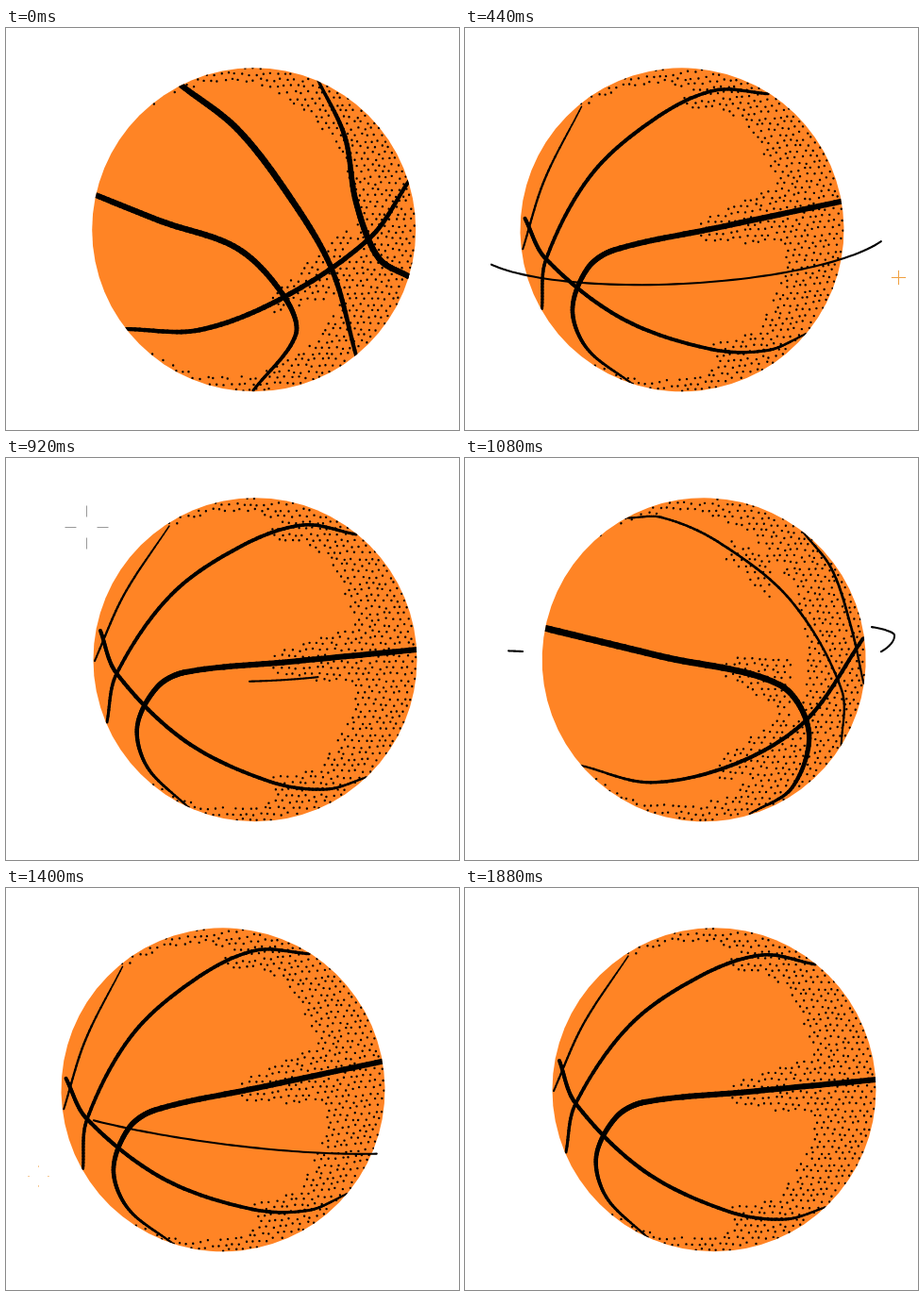
Recreate the animation shown at these times as an HTML page with a canvas. Size 480x426 px, loop 1.92 s.

```html
<!DOCTYPE html>
<html lang="en">
<head>
<meta charset="utf-8">
<title>Spinning basketball</title>
<style>
  html, body { margin: 0; width: 100%; height: 100%; overflow: hidden; background: #fff; }
  canvas { display: block; width: 480px; height: 426px; }
</style>
</head>
<body>
<canvas id="stage" width="480" height="426"></canvas>
<script>
const W = 480, H = 426, R = 171.5, CY = 213.8;
const STEP = 40, STEPS = 48, HOLD = 3;
const ORANGE = '#ff8425', INK = '#000';
const { PI, sin, cos, hypot, min, max, abs } = Math;
const ctx = document.getElementById('stage').getContext('2d');

const clamp = v => max(0, min(1, v));
const mix = (a, b, k) => a + (b - a) * k;
const rad = deg => deg * PI / 180;

// The ball swings sideways and leans with the swing.
const swing = n => cos((n - 22.4) * PI / 12);
const ballX = n => 247 + 17.2 * swing(n);
const lean = n => rad(3.3) * swing(n);

function random(seed) {
  return () => (seed = (seed * 16807) % 2147483647) / 2147483647;
}

// Smooth curve through points, tangents weighted by chord length
function curve(pts, n = 16) {
  const dist = (a, b) => hypot(b[0] - a[0], b[1] - a[1]);
  const slopes = pts.map((p, i) => {
    const a = pts[max(0, i - 1)], b = pts[min(pts.length - 1, i + 1)];
    const d = dist(a, p) + dist(p, b);
    return [(b[0] - a[0]) / d, (b[1] - a[1]) / d];
  });
  const out = [pts[0]];
  for (let i = 1; i < pts.length; i++) {
    const a = pts[i - 1], b = pts[i], h = dist(a, b);
    for (let j = 1; j <= n; j++) {
      const t = j / n, u = 1 - t;
      out.push([0, 1].map(k =>
        a[k] * u * u * (1 + 2 * t) + b[k] * t * t * (3 - 2 * t)
        + h * t * u * (slopes[i - 1][k] * u - slopes[i][k] * t)));
    }
  }
  return out;
}

// A seam runs from width w0 to w1 and swells in the middle.
function seam(w0, w1, ...pts) {
  const line = curve(pts);
  const width = line.map((p, i) => {
    const t = i / (line.length - 1);
    return mix(w0, w1, t) + 0.17 * (w0 + w1) * sin(PI * t);
  });
  return { line, width };
}

// Four drawings, each placed as it looks at step "at"
const poses = [
  { at: 0, seams: [
    seam(6, 3, [95, 177], [165, 205], [246, 234], [295, 285], [307, 325], [262, 384]),
    seam(6, 4, [186, 61], [245, 107], [300, 178], [345, 255], [371, 347]),
    seam(3, 6, [331, 56], [359, 115], [371, 185], [395, 244], [428, 264]),
    seam(4, 4, [127, 319], [205, 320], [295, 285], [386, 222], [427, 162])
  ] },
  { at: 15, seams: [
    seam(7, 2, [70, 187], [195, 212], [322, 237], [355, 285], [340, 345], [296, 375]),
    seam(2, 4, [115, 331], [190, 346], [280, 322], [352, 273], [408, 185]),
    seam(2, 2, [154, 67], [190, 65], [250, 88], [330, 147], [388, 240], [390, 300]),
    seam(2, 2, [340, 74], [372, 112], [395, 172], [411, 232])
  ] },
  { at: 7, seams: [
    seam(6, 5, [67, 234], [80, 216], [235, 206], [390, 203], [406, 213]),
    seam(1.5, 1.5, [84, 138], [150, 78], [240, 63], [330, 83], [384, 125]),
    seam(1.5, 1.5, [82, 288], [150, 341], [235, 357], [330, 336], [398, 282])
  ] },
  { at: 23, seams: [
    seam(2, 6, [193, 370], [150, 328], [139, 285], [160, 243], [190, 227], [300, 216], [436, 203]),
    seam(4, 2, [100, 183], [117, 228], [190, 300], [280, 343], [340, 351], [383, 338]),
    seam(3, 3, [107, 280], [117, 229], [175, 145], [250, 93], [315, 71], [371, 81]),
    seam(2, 1.5, [94, 215], [125, 145], [173, 72])
  ] }
];

// Shade lies in a rim that widens to the right, and along the flatter seams.
function shaded(x, y, flats) {
  const r = hypot(x, y), c = x / r;
  if (r > R - 18 - c * (c > 0 ? 44 : 26)) return true;
  const reach = 4 + 0.28 * x;
  return x > 18 && flats.some(p => abs(p[0] - x) < 6 && abs(p[1] - y) < reach);
}

function stipple(pose, i) {
  const rnd = random(91 + i * 37), gap = 7.4, cx = ballX(pose.at), flats = [], dots = [];
  pose.seams.forEach(({ line }) => line.forEach((p, k) => {
    const q = line[k + 1];
    if (q && abs(q[1] - p[1]) < 0.8 * abs(q[0] - p[0])) flats.push([p[0] - cx, p[1] - CY]);
  }));
  for (let row = 0, y = -R; y < R; y += gap * 0.87, row++) {
    for (let x = -R + (row % 2) * gap / 2; x < R; x += gap) {
      const px = x + (rnd() - 0.5) * 3, py = y + (rnd() - 0.5) * 3;
      if (hypot(px, py) < R && shaded(px, py, flats)) dots.push([px, py]);
    }
  }
  return dots;
}
poses.forEach((p, i) => { p.dots = stipple(p, i); });

function drawSeam({ line, width }) {
  for (let i = 1; i < line.length; i++) {
    ctx.lineWidth = width[i];
    ctx.beginPath();
    ctx.moveTo(...line[i - 1]);
    ctx.lineTo(...line[i]);
    ctx.stroke();
  }
}

function drawBall(n) {
  const pose = poses[Math.floor(n / HOLD) % poses.length];
  ctx.save();
  ctx.translate(ballX(n), CY);
  ctx.rotate(lean(n) - lean(pose.at));
  ctx.beginPath();
  ctx.arc(0, 0, R, 0, 2 * PI);
  ctx.fillStyle = ORANGE;
  ctx.fill();
  ctx.clip();
  ctx.fillStyle = INK;
  ctx.beginPath();
  pose.dots.forEach(([x, y]) => {
    ctx.moveTo(x + 1.2, y);
    ctx.arc(x, y, 1.2, 0, 2 * PI);
  });
  ctx.fill();
  ctx.translate(-ballX(pose.at), -CY);
  pose.seams.forEach(drawSeam);
  ctx.restore();
}

// Speed lines run along tilted orbits; angle 0 is the front, 90 the right side.
// head and tail: the steps in which each end travels the whole arc
const trails = [
  { x: 231, y: 219, rx: 223, ry: 52, tilt: -0.05, arc: [-122, 117], head: [3.6, 12.8], tail: [8, 20.7] },
  { x: 235, y: 188, rx: 220, ry: 49, tilt: 0, arc: [6, 117], head: [22.2, 26.7], tail: [23, 30] },
  { x: 235, y: 236, rx: 227, ry: 36, tilt: 0.125, arc: [-130, 130], head: [26.7, 39.1], tail: [31, 42.4] }
];

function drawTrail(t, n) {
  const angle = ([a, b]) => mix(...t.arc, clamp((n - a) / (b - a)));
  const from = angle(t.tail), to = angle(t.head);
  if (to - from < 0.5) return;
  ctx.beginPath();
  for (let i = 0; i <= 60; i++) {
    const a = rad(mix(from, to, i / 60));
    const dx = t.rx * sin(a), depth = cos(a);
    ctx.lineTo(t.x + dx, t.y + t.tilt * dx + t.ry * depth * (depth < 0 ? 0.4 : 1));
  }
  ctx.strokeStyle = INK;
  ctx.lineWidth = 2.1;
  ctx.stroke();
}

const sparkles = [
  { x: 459, y: 264, r: 13.5, start: 10, life: 6, color: '#f0a040' },
  { x: 85, y: 73, r: 23, start: 20, life: 5, color: '#999' },
  { x: 34, y: 305, r: 11, start: 30, life: 6, color: '#f0a040' }
];

function drawSparkle(s, n) {
  const age = (n - s.start + 0.7) / s.life;
  if (age <= 0 || age >= 1) return;
  const outer = s.r * clamp(age * 2), inner = s.r * clamp(age * 2 - 1);
  ctx.strokeStyle = s.color;
  ctx.lineWidth = 1;
  ctx.beginPath();
  [[1, 0], [-1, 0], [0, 1], [0, -1]].forEach(([dx, dy]) => {
    ctx.moveTo(s.x + 0.5 + dx * inner, s.y + 0.5 + dy * inner);
    ctx.lineTo(s.x + 0.5 + dx * outer, s.y + 0.5 + dy * outer);
  });
  ctx.stroke();
}

function draw(n) {
  ctx.fillStyle = '#fff';
  ctx.fillRect(0, 0, W, H);
  ctx.lineCap = 'butt';
  sparkles.forEach(s => drawSparkle(s, n));
  ctx.lineCap = ctx.lineJoin = 'round';
  ctx.strokeStyle = INK;
  drawBall(n);
  trails.forEach(t => drawTrail(t, n));
}

const begin = performance.now();
function tick() {
  draw(Math.floor((performance.now() - begin) / STEP) % STEPS);
  requestAnimationFrame(tick);
}
tick();
</script>
</body>
</html>
```
